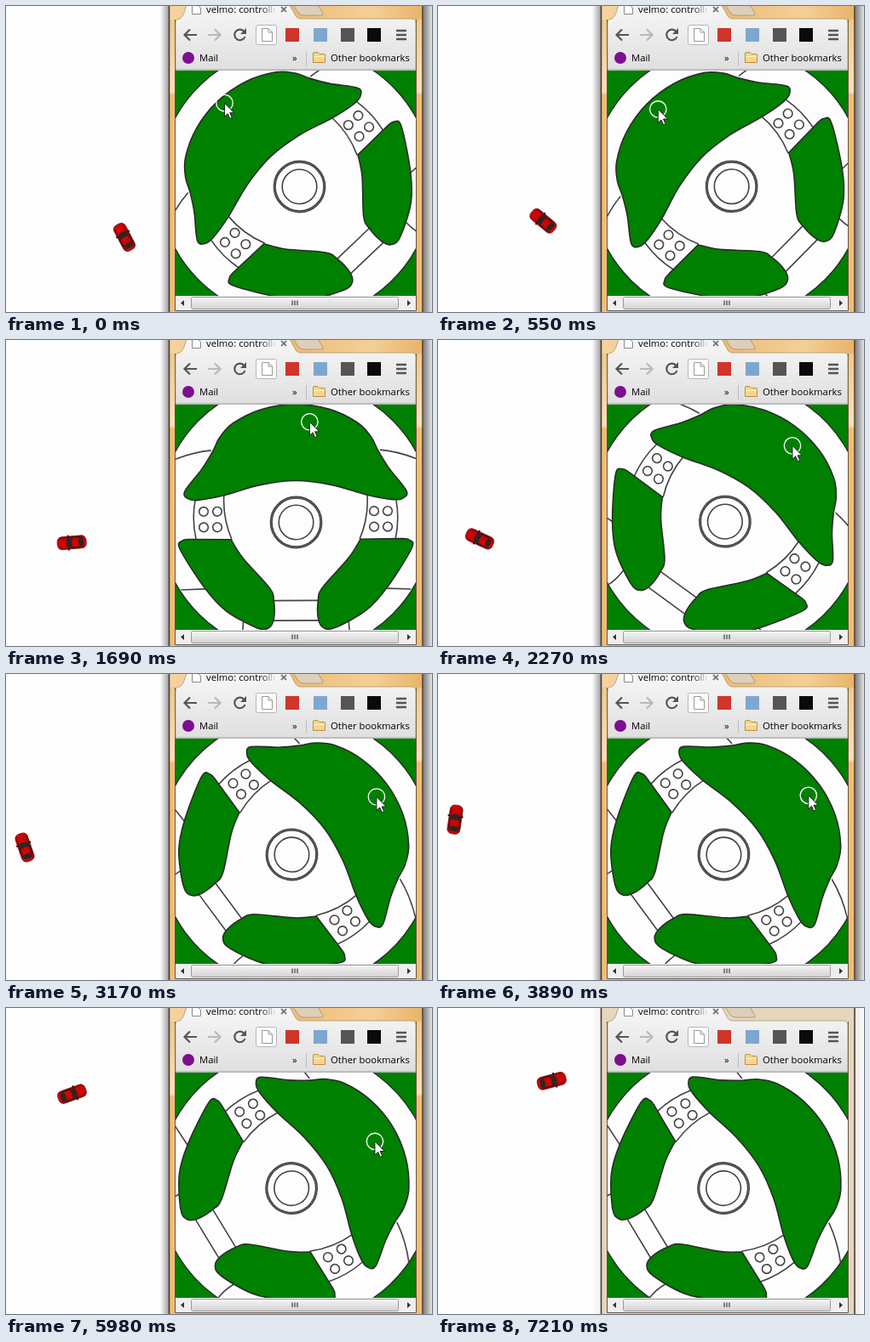
Recreate the animation shown at these times as an HTML page. Size 500 px wide and 360 px high, loop 7260 ms.

```html
<!DOCTYPE html>
<html lang="en">
<head>
<meta charset="utf-8">
<title>Steering wheel</title>
<style>
  html, body { margin: 0; width: 100%; height: 100%; overflow: hidden; background: #fdfdfd; }
  svg { display: block; }
  text { font: 11.3px "Open Sans", "Noto Sans", sans-serif; fill: #000; }
  .line { fill: none; stroke: #444; stroke-width: 1.6; }
  .hole { fill: #008000; stroke: #2b2b2b; stroke-width: 1.6; }
</style>
</head>
<body>
<svg id="stage" width="500" height="360" viewBox="0 0 500 360">
  <defs>
    <linearGradient id="bar" x2="0" y2="1">
      <stop offset="0" stop-color="#f7f7f7"/><stop offset="1" stop-color="#dfdfdf"/>
    </linearGradient>
    <linearGradient id="frame" x2="0" y2="1">
      <stop offset="0" stop-color="#efc382"/><stop offset=".28" stop-color="#fbe2b6"/>
      <stop offset=".29" stop-color="#f3bd72"/><stop offset="1" stop-color="#f1bd78"/>
    </linearGradient>
    <linearGradient id="top">
      <stop offset="0" stop-color="#f5d3a0"/><stop offset=".5" stop-color="#edbd78"/>
      <stop offset=".8" stop-color="#f4cf96"/><stop offset="1" stop-color="#e9b469"/>
    </linearGradient>
    <linearGradient id="shadeL">
      <stop offset="0" stop-opacity="0"/><stop offset="1" stop-opacity=".38"/>
    </linearGradient>
    <linearGradient id="shadeR">
      <stop offset="0" stop-opacity=".5"/><stop offset="1" stop-opacity=".1"/>
    </linearGradient>
    <linearGradient id="fade">
      <stop offset="0" stop-color="#f5f5f5" stop-opacity="0"/><stop offset="1" stop-color="#f5f5f5"/>
    </linearGradient>
    <linearGradient id="thumb" x2="0" y2="1">
      <stop offset="0" stop-color="#f6f6f6"/><stop offset="1" stop-color="#d2d2d5"/>
    </linearGradient>
    <linearGradient id="paint">
      <stop offset="0" stop-color="#8d0000"/><stop offset=".25" stop-color="#d00606"/>
      <stop offset=".75" stop-color="#c80404"/><stop offset="1" stop-color="#7d0000"/>
    </linearGradient>
    <clipPath id="tab"><rect x="230" width="87" height="14"/></clipPath>
  </defs>

  <g id="car">
    <rect x="-7.500" y="-17" width="15" height="34" rx="5.500" fill="url(#paint)" stroke="#6a1010" stroke-width=".7"/>
    <path d="M-9-4h3M6-4h3" stroke="#400" stroke-width="1.800"/>
    <path d="M-6.300-4.500Q0-8.500 6.300-4.500L5 1Q0-1-5 1Z" fill="#2e2424"/>
    <path d="M-4.800 8.500Q0 7 4.800 8.500L5.300 13Q0 15-5.300 13Z" fill="#2e2424"/>
    <path d="M-6-1V10M6-1V10" stroke="#3a1010" stroke-width="1.200"/>
  </g>

  <!-- window frame -->
  <g id="shadow">
    <rect x="181" width="10.500" height="360" fill="url(#shadeL)"/>
    <rect x="490" width="10" height="360" fill="url(#shadeR)"/>
  </g>
  <rect x="191" width="299" height="360" fill="url(#frame)"/>
  <rect x="192" width="297" height="16" fill="url(#top)"/>
  <rect id="idle" x="191" width="299" height="360" fill="#e6d6bb" opacity="0"/>
  <path d="M191.500 0V360M489 0V360" stroke="#40362c" stroke-width="1.500"/>
  <path d="M198.500 16V358.500H481.500V16" fill="none" stroke="#655540"/>

  <!-- tab and toolbar -->
  <path d="M337-1H364Q367-1 368 2L372 9Q373 11 370 11H350Q346 11 344 9Z" fill="#ddd0bb" stroke="#a78d64" stroke-width=".8"/>
  <path d="M199 75V20Q199 15 204 15Q207 13 209 8L212-1H333L339 10Q341 15 346 15H476Q481 15 481 20V75Z" fill="url(#bar)" stroke="#a08a68" stroke-width=".7"/>
  <path d="M199 75.500H481" stroke="#b5b5b5"/>
  <path d="M218.500-1V9.500H228.500V2L225-1" fill="#fff" stroke="#8a8a8a"/>
  <g clip-path="url(#tab)">
    <text x="235" y="8">velmo: controller</text>
    <rect x="299" width="18" height="13" fill="url(#fade)"/>
  </g>
  <path d="M323 1l6 6M329 1l-6 6" stroke="#666" stroke-width="1.700"/>
  <g fill="none" stroke="#555" stroke-width="2.200">
    <path d="M224 34H210M216 27.500L209.500 34L216 40.500"/>
    <path d="M237 34H251M245 27.500L251.500 34L245 40.500" stroke="#b9b9b9"/>
    <path d="M279.500 30A6.300 6.300 0 1 0 280.500 36"/>
    <path d="M458 29H470M458 34H470M458 39H470" stroke-width="2.400"/>
  </g>
  <path d="M282 26V33H275Z" fill="#555"/>
  <rect x="293.500" y="22.500" width="24" height="23" rx="2" fill="#fbfbfb" stroke="#b5b5b5"/>
  <path d="M300.500 26.500H308L312.500 31V41.500H300.500ZM308 26.500V31H312.500" fill="#fff" stroke="#999"/>
  <rect x="328" y="26" width="16" height="16" fill="#d0342b"/>
  <rect x="361" y="26" width="16" height="16" fill="#7fa6cf"/>
  <rect x="393" y="26" width="16" height="16" fill="#555"/>
  <rect x="424" y="26" width="16" height="16" fill="#0a0a0a"/>
  <circle cx="214" cy="61" r="7" fill="#7b0f8f"/>
  <text x="227" y="65">Mail</text>
  <text x="336" y="65">»</text>
  <path d="M352.500 53V70" stroke="#bdbdbd"/>
  <path d="M360.500 56Q360.500 54.500 362 54.500H366L368 56.500H373Q374.500 56.500 374.500 58V66.500H360.500Z" fill="#f6d58b" stroke="#c08f35"/>
  <path d="M361 59.500H374" stroke="#fff3cf"/>
  <text x="381" y="65">Other bookmarks</text>

  <!-- page -->
  <svg x="199" y="76" width="282" height="265" viewBox="-141 -132.500 282 265">
    <rect x="-141" y="-133" width="282" height="266" fill="#008000"/>
    <g id="wheel"></g>
  </svg>
  <rect x="199" y="341" width="282" height="17" fill="#efefef"/>
  <rect x="217.500" y="342.500" width="243" height="14" rx="2" fill="url(#thumb)" stroke="#9a9a9a"/>
  <path d="M336 346.500V352M339 346.500V352M342 346.500V352" stroke="#555" stroke-width="1.400"/>
  <path d="M209 346V353L205 349.500ZM471 346V353L475 349.500Z" fill="#333"/>

  <g id="cursor">
    <circle id="ring" r="9.700" fill="none" stroke="#fff" stroke-width="1.300"/>
    <path d="M0 0V16L3.700 12.500L6.300 18.300L8.800 17.200L6.200 11.500H11.300Z" fill="#fff" stroke="#111" stroke-width=".9"/>
  </g>
</svg>
<script>
const LOOP = 7260, STEP = 90, RELEASE = 6130;
const SPEED = 0.046;                 // car, px per ms
const PIVOT = { x: 340, y: 208.5 };  // centre of the page
const RAD = Math.PI / 180;
const $ = id => document.getElementById(id);

// Key points: [time, value]
const heading = [[0, -28], [1650, -96], [3420, -5], [6100, 75], [LOOP, 75]];
const steering = [[0, -43.6], [900, -40], [2270, 37], [3170, 53.6], [4730, 51.6], [5980, 59]];
const reach = [[0, 126], [1170, 114], [4730, 115], [5980, 106]];

function span(keys, t) {
  const i = keys.findIndex(k => k[0] > t) - 1;
  return { i, u: (t - keys[i][0]) / (keys[i + 1][0] - keys[i][0]) };
}

function linear(keys, t) {
  const { i, u } = span(keys, t);
  return keys[i][1] + (keys[i + 1][1] - keys[i][1]) * u;
}

// Cubic with slopes taken from the neighbours, held after the last key
function eased(keys, t) {
  const last = keys.length - 1;
  if (t >= keys[last][0]) return keys[last][1];
  const { i, u } = span(keys, t), w = 1 - u;
  const slope = j => {
    const p = keys[Math.max(j - 1, 0)], q = keys[Math.min(j + 1, last)];
    return (q[1] - p[1]) / (q[0] - p[0]) * (keys[i + 1][0] - keys[i][0]);
  };
  return keys[i][1] * (1 + 2 * u) * w * w + slope(i) * u * w * w +
    keys[i + 1][1] * u * u * (3 - 2 * u) - slope(i + 1) * u * u * w;
}

// The car drives along its heading at constant speed
function carAt(t) {
  let x = 139, y = 272;
  const dt = 10;
  for (let s = 0; s < t; s += dt) {
    const a = linear(heading, s + dt / 2) * RAD;
    x += Math.sin(a) * SPEED * dt;
    y -= Math.cos(a) * SPEED * dt;
  }
  return `translate(${x} ${y}) rotate(${linear(heading, t)})`;
}

// While dragging, the wheel trails the cursor; after release the cursor leaves downwards
function cursorAt(t) {
  const a = (eased(steering, t + 100) + 2) * RAD, r = eased(reach, t);
  const away = Math.max(0, t - RELEASE);
  return `translate(${PIVOT.x + Math.sin(a) * r + away * 0.05} ${PIVOT.y - Math.cos(a) * r + away * 0.33})`;
}

function smooth(pts, closed) {
  const n = pts.length;
  const at = i => closed ? pts[(i + n) % n] : pts[Math.min(Math.max(i, 0), n - 1)];
  let d = 'M' + pts[0];
  for (let i = 0; i < (closed ? n : n - 1); i++) {
    const [p, a, b, q] = [at(i - 1), at(i), at(i + 1), at(i + 2)];
    d += `C${a.map((v, k) => v + (b[k] - p[k]) / 6)} ${b.map((v, k) => v - (q[k] - a[k]) / 6)} ${b}`;
  }
  return d + 'Z';
}

function buildWheel() {
  const half = [[42, -38], [84, -26], [114, -20.5], [126, -22], [130, -31],
    [110, -57], [97, -78], [89, -94], [73, -111], [40, -127]];
  const mirror = half.map(([x, y]) => [-x, y]).reverse();
  const hat = smooth([[0, -43], ...half, [0, -133], ...mirror], true);
  const side = smooth([[-76, 26], [-62, 48], [-31, 83], [-26, 98], [-26, 119], [-32, 130],
    [-46, 130], [-82, 110], [-107, 83], [-136, 37], [-133, 27], [-124, 25.5]]);
  const lines = 'M-118-20Q-122 3-117 26M-84-27Q-86 0-75 26' +
    'M-99-79Q-122-77-148-66M-106 84L-135 85M-62 123Q-62 145-74 160';
  let dots = '';
  for (const x of [-108, -92])
    for (const y of [-7, 11.5]) dots += `<circle cx="${x}" cy="${y}" r="5.3" class="line"/>`;
  const flank = `<path d="${lines}" class="line"/>${dots}<path d="${side}" class="hole"/>`;
  $('wheel').innerHTML =
    `<circle r="161" fill="#fdfdfd" stroke="#2b2b2b" stroke-width="1.4"/>
     <path d="M-26 98H26M-27 121.500H27" class="line"/>
     <g>${flank}</g><g transform="scale(-1 1)">${flank}</g>
     <path d="${hat}" class="hole"/>
     <g class="line" transform="translate(.5 6)">
       <circle r="29.300" style="stroke-width:3.200"/>
       <circle r="29.300" stroke="#999" style="stroke:#999;stroke-width:.7" stroke-dasharray="1 1"/>
       <circle r="20.300"/>
     </g>`;
}

function draw(t) {
  $('car').setAttribute('transform', carAt(t));
  $('wheel').setAttribute('transform', `rotate(${eased(steering, t)})`);
  $('cursor').setAttribute('transform', cursorAt(t));
  $('ring').style.display = t < RELEASE ? '' : 'none';
  // The window loses focus at the end
  const idle = Math.min(Math.max((t - 7000) / 200, 0), 1);
  $('idle').setAttribute('opacity', idle);
  $('shadow').setAttribute('opacity', 1 - idle * 0.85);
}

buildWheel();
const began = performance.now();
function tick() {
  const t = (performance.now() - began) % LOOP;
  draw(Math.floor(t / STEP) * STEP);
  requestAnimationFrame(tick);
}
tick();
</script>
</body>
</html>
```
